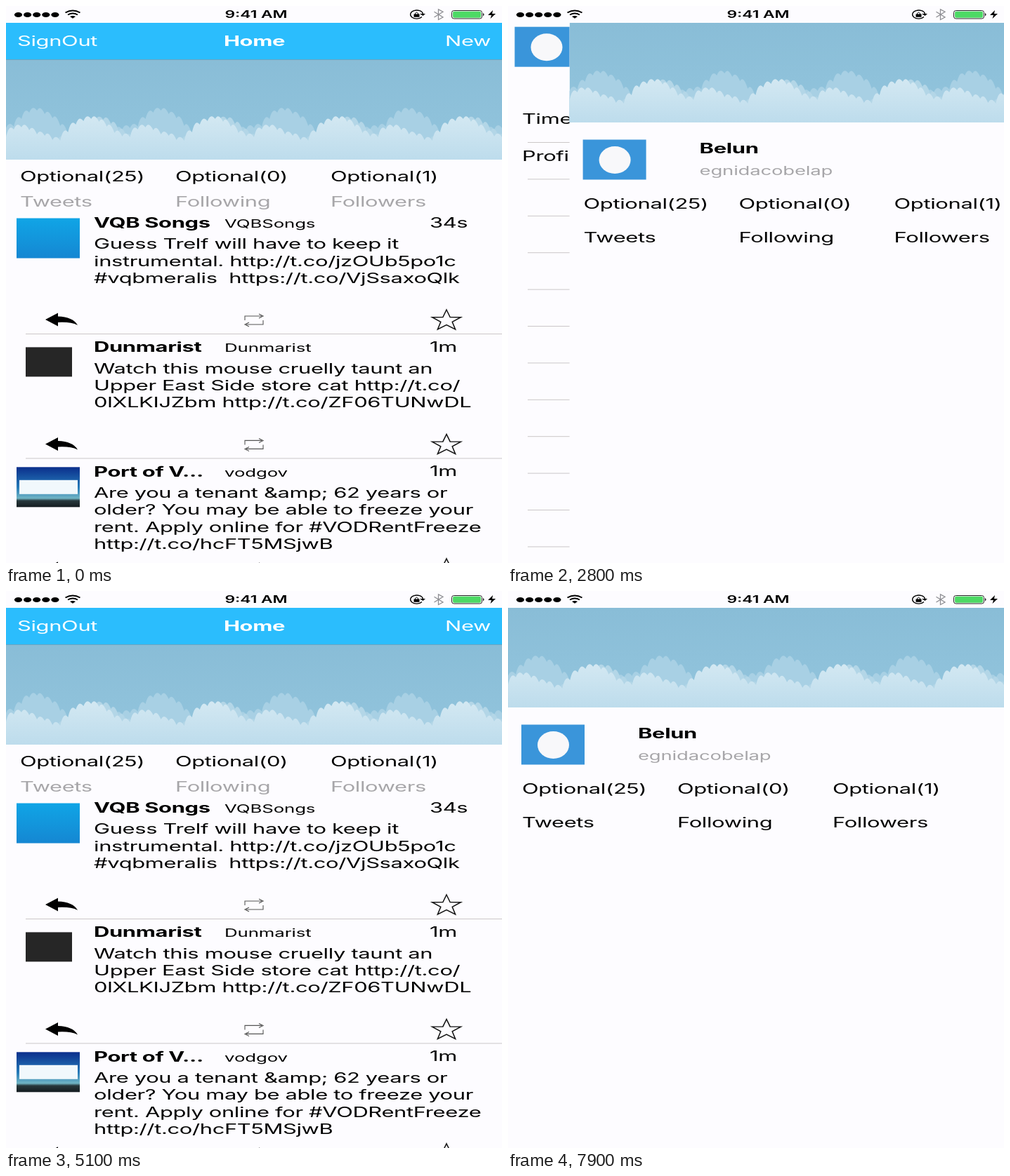
Recreate the animation shown at these times as an HTML page. Size 706 by 794 pixels, loop 8 s.

```html
<!DOCTYPE html>
<html lang="en">
<head>
<meta charset="utf-8">
<title>Slide-out menu</title>
<style>
html, body { margin: 0; width: 100%; height: 100%; overflow: hidden; background: #fdfcff; }
svg { display: block; width: 706px; height: 794px; }
svg svg { width: 706px; height: 142px; }
text { font-family: Inter, Roboto, sans-serif; white-space: pre; }
</style>
</head>
<body>
<svg id="stage" viewBox="0 0 706 794" xmlns="http://www.w3.org/2000/svg"></svg>
<script>
const PAPER = '#fdfcff', GRAY = '#a7a6a9', LINE = '#cbc7c8';
const LOOP = 8000, STEP = 100, OPEN_X = 612;

const esc = s => s.replace(/&/g, '&amp;').replace(/</g, '&lt;');
const rect = (x, y, w, h, fill) =>
  `<rect x="${x}" y="${y}" width="${w}" height="${h}" fill="${fill}"/>`;
const path = (d, attrs) => `<path d="${d}" ${attrs}/>`;
const group = (x, y, body) => `<g transform="translate(${x} ${y})">${body}</g>`;
const rule = (x, y) => rect(x, y, 706 - x, 1, LINE);

// The phone screen (375 x 667 points) is shown on a wider stage.
function label(x, y, str, { size = 16.4, weight = 400, fill = '#000', anchor = 'start', gap = -0.18 } = {}) {
  return `<text transform="translate(${x} ${y}) scale(1.883 1.19)" font-size="${size}" ` +
    `font-weight="${weight}" fill="${fill}" text-anchor="${anchor}" letter-spacing="${gap}">${esc(str)}</text>`;
}

const defs = `<defs>
  <linearGradient id="sky" x2="0" y2="1"><stop stop-color="#89bdd7"/><stop offset="1" stop-color="#93c5dd"/></linearGradient>
  <linearGradient id="front" x2="0" y2="1"><stop stop-color="#d3e8f2"/><stop offset="1" stop-color="#bddcec"/></linearGradient>
  <linearGradient id="blue" x2="0" y2="1"><stop stop-color="#10a5e6"/><stop offset="1" stop-color="#1587d2"/></linearGradient>
  <linearGradient id="dusk" x2="0" y2="1"><stop stop-color="#0b2f8c"/><stop offset=".5" stop-color="#2479b8"/>
    <stop offset=".78" stop-color="#6fb4c4"/><stop offset=".84" stop-color="#27383c"/><stop offset="1" stop-color="#141c20"/></linearGradient>
</defs>`;

// Scalloped cloud edge, repeated across the banner.
function cloud(heights, left, fill) {
  const period = 176.5, dx = period / heights.length;
  let d = 'M-200 142', prev = null;
  for (let k = -1; k < 5; k++) {
    heights.forEach((y, i) => {
      const x = k * period + i * dx + left;
      d += prev === null ? `L${x} ${y}` : `Q${x - dx / 2 - 1} ${Math.min(prev, y) - 9} ${x} ${y}`;
      prev = y;
    });
  }
  return path(d + 'V142Z', `fill="${fill}"`);
}

const banner = y => `<svg x="0" y="${y}" width="706" height="142">` +
  rect(0, 0, 706, 142, 'url(#sky)') +
  cloud([97, 95, 84, 75, 72, 77, 83, 94, 106, 114, 120, 118, 114, 108, 102, 99], 0, '#a8d0e4') +
  cloud([118, 122, 124, 124, 124, 122, 118, 112, 106, 100, 94, 86, 85, 91, 101, 108], 6, '#b3d6e7') +
  cloud([110, 99, 96, 100, 106, 108, 114, 115, 103, 92, 87, 84, 88, 95, 104, 109], 0, 'url(#front)') +
  '</svg>';

const avatar = (x, y) => rect(x, y, 90, 57, '#3a95da') +
  `<ellipse cx="${x + 45.5}" cy="${y + 29}" rx="22.5" ry="19.5" fill="#f8f8fa"/>`;

const columns = (y, words, opts) =>
  words.map((w, i) => label([20, 241, 462][i], y, w, opts)).join('');
const counts = ['Optional(25)', 'Optional(0)', 'Optional(1)'];
const kinds = ['Tweets', 'Following', 'Followers'];

function star(cx, cy, rx, ry) {
  let d = '';
  for (let i = 0; i < 10; i++) {
    const a = Math.PI * (i / 5 - 0.5), r = i % 2 ? 0.4 : 1;
    d += (i ? 'L' : 'M') + (cx + rx * r * Math.cos(a)).toFixed(1) + ' ' + (cy + ry * r * Math.sin(a)).toFixed(1);
  }
  return path(d + 'Z', 'fill="none" stroke="#111" stroke-width="1.5"');
}

const actions =
  path('M56 447L74 437.5V442.5Q95 443 102 455Q92 450 74 451V456.5Z', 'fill="#000"') +
  path('M340 448V442H364M360 439L366 442L360 445M366 448V454H342M346 451L340 454L346 457',
    'fill="none" stroke="#555" stroke-width="1.1"') +
  star(627, 448.5, 21.5, 15.5);

const post = (i, pic, name, handle, age, lines) => group(0, i * 177.4,
  pic +
  label(125, 315.7, name, { weight: 700 }) +
  label(311, 316, handle, { size: 13.7, gap: -0.05 }) +
  label(603, 315.5, age) +
  lines.map((s, n) => label(125, 346.3 + n * 24.2, s)).join('') +
  actions + rule(28, 467));

const home = rect(0, 0, 706, 794, PAPER) +
  rect(0, 24, 706, 52, '#2bbdfd') + rect(0, 76, 706, 1, '#6aa5c2') +
  label(16, 57, 'SignOut', { fill: '#fff' }) +
  label(353.5, 57, 'Home', { fill: '#fff', weight: 700, anchor: 'middle' }) +
  label(690, 57, 'New', { fill: '#fff', anchor: 'end' }) +
  banner(77) +
  columns(249.8, counts) + columns(286.3, kinds, { fill: GRAY }) +
  post(0, rect(15, 302.5, 90, 57, 'url(#blue)'), 'VQB Songs', 'VQBSongs', '34s', [
    'Guess Trelf will have to keep it',
    'instrumental. http://t.co/jzOUb5po1c',
    '#vqbmeralis  https://t.co/VjSsaxoQlk']) +
  post(1, rect(28, 309, 66, 42, '#262626'), 'Dunmarist', 'Dunmarist', '1m', [
    'Watch this mouse cruelly taunt an',
    'Upper East Side store cat http://t.co/',
    '0lXLKIJZbm http://t.co/ZF06TUNwDL']) +
  post(2, rect(15, 302.5, 90, 57, 'url(#dusk)') + rect(19, 321, 83, 20, '#f1f8fc'), 'Port of V...', 'vodgov', '1m', [
    'Are you a tenant &amp; 62 years or',
    'older? You may be able to freeze your',
    'rent. Apply online for #VODRentFreeze',
    'http://t.co/hcFT5MSjwB']);

const USER = 'Belun', HANDLE = 'egnidacobelap';

const profile = rect(0, 0, 706, 794, PAPER) + banner(24) + avatar(19, 190.5) +
  label(185, 209.8, USER, { weight: 700 }) +
  label(185, 240.5, HANDLE, { size: 14.6, fill: GRAY, gap: -0.1 }) +
  columns(289, counts) + columns(337, kinds);

let menu = rect(0, 0, 706, 794, PAPER) + avatar(9.5, 29.7) +
  label(119, 48.5, USER, { size: 15.7, weight: 700 }) +
  label(110, 81, HANDLE) +
  label(20, 168, 'TimeLine') + label(20, 220.5, 'Profile');
for (let i = 0; i < 12; i++) menu += rule(28, 194 + i * 52.4);

let bar = '';
for (let i = 0; i < 5; i++) bar += `<ellipse cx="${17.5 + i * 13.1}" cy="12.5" rx="5.6" ry="3.5"/>`;
bar += path('M84.5 9.5Q95 3.5 105.5 9.5M88 12.5Q95 8.5 102 12.5', 'fill="none" stroke="#000" stroke-width="2"') +
  path('M91 15Q95 12.8 99 15L95 17.8Z', '') +
  label(356, 17, '9:41 AM', { size: 12.1, weight: 600, anchor: 'middle', gap: 0 }) +
  path('M592 15.5A9 6 0 1 1 593.5 11', 'fill="none" stroke="#000" stroke-width="1.3"') +
  path('M589 11H597L593.5 14Z', '') +
  rect(580.5, 11.5, 8, 4.3, '#000') +
  path('M582.5 12V10.5Q584.5 7.5 586.5 10.5V12', 'fill="none" stroke="#000"') +
  path('M609.5 8.2L622 16L615.5 19.5V4.8L622 8.2L609.5 16', 'fill="none" stroke="#8e8e93" stroke-width="1.3"') +
  '<rect x="634.5" y="6.5" width="43" height="11.5" rx="3" fill="none" stroke="#222"/>' +
  '<rect x="636" y="7.8" width="40" height="9" rx="2" fill="#4cd964"/>' +
  path('M679 10Q682 12.2 679 14.5Z', '') +
  path('M693 6L686 13H691L689.5 18L697 11H692Z', '');

const stage = document.getElementById('stage');
stage.innerHTML = defs + menu +
  `<g id="panel"><g id="home">${home}</g><g id="profile">${profile}</g></g><g>${bar}</g>`;
const [panel, homeView, profileView] = ['panel', 'home', 'profile'].map(id => document.getElementById(id));

// Each visit to the menu: opening start and end, closing start and end.
const visits = [
  [1600, 2050, 2480, 2900],
  [3350, 3760, 4090, 4550],
  [5450, 5800, 5940, 6280]
];
const ease = (t, a, b) => {
  const u = Math.min(1, Math.max(0, (t - a) / (b - a)));
  return u * u * (3 - 2 * u);
};

function draw(now) {
  const t = Math.floor((now % LOOP) / STEP) * STEP;
  let open = 0, picks = 0;
  for (const [a, b, c, d] of visits) {
    open += ease(t, a, b) - ease(t, c, d);
    if (t >= c) picks++;
  }
  panel.setAttribute('transform', `translate(${(open * OPEN_X).toFixed(1)} 0)`);
  homeView.style.display = picks % 2 ? 'none' : '';
  profileView.style.display = picks % 2 ? '' : 'none';
}

let start = null;
function tick(now) {
  if (start === null) start = now;
  draw(now - start);
  requestAnimationFrame(tick);
}
draw(0);
requestAnimationFrame(tick);
</script>
</body>
</html>
```
